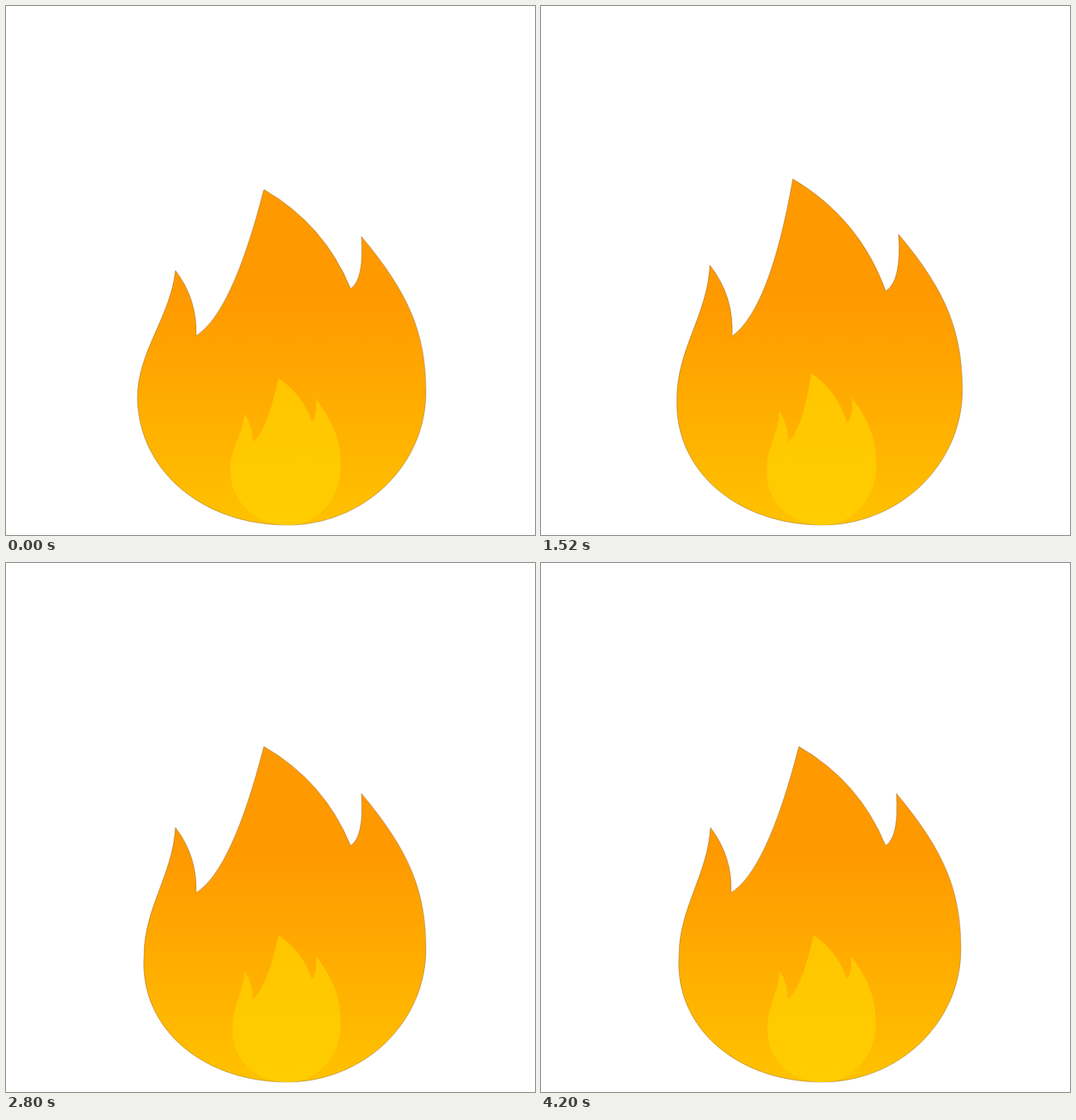
Recreate the animation shown at these times as an HTML page with a canvas. Size 640 by 640 pixels, loop 4.24 s.

```html
<!DOCTYPE html>
<html lang="en">
<head>
<meta charset="utf-8">
<title>Flame</title>
<style>
  html, body { margin: 0; width: 100%; height: 100%; overflow: hidden; background: #fff; }
  canvas { display: block; width: 100vmin; height: 100vmin; }
</style>
</head>
<body>
<canvas width="640" height="640"></canvas>
<script>
const ctx = document.querySelector('canvas').getContext('2d');
const LOOP = 4240, STEP = 40, CYCLE = 1400, BASE = 628;

// Each pose: how far the tongues bend, how much the bend sags into the notches,
// the widest x on both sides, and the tips and notches from left to right.
const low = { lean: 0.18, sag: 0.28, left: 159, right: 508,
  points: [[205, 320], [230, 399], [312, 222], [417, 342], [430, 279]] };
const leanLeft = { lean: 0.23, sag: 0.21, left: 153, right: 518,
  points: [[201, 285], [236, 402], [272, 152], [418, 359], [444, 264]] };
const upright = { lean: 0.02, sag: 0, left: 147, right: 511,
  points: [[210, 285], [240, 398], [328, 150], [418, 390], [444, 282]] };
const leanRight = { lean: -0.24, sag: 0.06, left: 144, right: 509,
  points: [[250, 244], [237, 374], [405, 143], [420, 397], [471, 292]] };

const lerp = (a, b, k) => a + (b - a) * k;
function mix(a, b, k) {
  const out = {};
  for (const key of ['lean', 'sag', 'left', 'right']) out[key] = lerp(a[key], b[key], k);
  out.points = a.points.map((p, i) => p.map((v, j) => lerp(v, b.points[i][j], k)));
  return out;
}
function grow(pose, k) {
  const points = pose.points.map(([x, y]) => [x, lerp(BASE, y, k)]);
  return { ...pose, left: lerp(pose.right, pose.left, k), points };
}

const easeIn = u => u * u, easeOut = u => u * (2 - u), easeBoth = u => u * u * (3 - 2 * u);
const narrow = { ...low, left: 167 };
const keys = [
  { at: 0, pose: narrow },
  { at: 440, pose: leanLeft, ease: easeBoth },
  { at: 600, pose: upright, ease: easeIn },
  { at: 820, pose: grow(mix(upright, leanRight, 0.75), 1.027), ease: easeOut },
  { at: 1080, pose: leanRight, ease: easeBoth },
  { at: CYCLE, pose: narrow, ease: easeBoth }
];

function poseAt(phase, first) {
  const n = keys.findIndex((key, i) => i > 0 && phase <= key.at);
  const from = keys[n - 1], to = keys[n];
  const start = first && n === 1 ? low : from.pose;
  return mix(start, to.pose, to.ease((phase - from.at) / (to.at - from.at)));
}

function flamePath({ lean, sag, left, right, points }) {
  const path = new Path2D();
  const leftY = 475, rightY = 467, reach = 0.37;

  // Handle at an outer tip: towards the side, turned by the lean, with a slight bulge.
  const tipHandle = ([x, y], sideX, sideY, side) => {
    const h = sideY - y, slope = (sideX - x) / h + side * 0.12 + 1.7 * lean;
    return [x + slope * h * reach, y + h * reach];
  };
  // Edge between a tip and a notch, bent sideways by the lean.
  const edge = ([x0, y0], [x1, y1], give) => {
    const dx = x1 - x0, dy = y1 - y0, sign = dy < 0 ? 1 : -1;
    const bend = sign * lean * give, slide = sign * lean > 0 ? -sign * sag : 0;
    path.quadraticCurveTo((x0 + x1) / 2 - bend * dy + slide * dx,
      (y0 + y1) / 2 + bend * dx + slide * dy, x1, y1);
  };

  const first = points[0], last = points[4];
  path.moveTo(left, leftY);
  path.bezierCurveTo(left, lerp(leftY, first[1], reach),
    ...tipHandle(first, left, leftY, -1), ...first);
  [1, 0.8, 0.95, 1.2].forEach((give, i) => edge(points[i], points[i + 1], give));
  path.bezierCurveTo(...tipHandle(last, right, rightY, 1),
    right, lerp(rightY, last[1], reach), right, rightY);
  path.bezierCurveTo(508, 556, 433, BASE, 340, BASE);
  path.bezierCurveTo(240, BASE, 161, 564, left, leftY);
  path.closePath();
  return path;
}

function gradient(top, from, to) {
  const g = ctx.createLinearGradient(0, top, 0, BASE);
  g.addColorStop(0, from);
  g.addColorStop(1, to);
  return g;
}
const outerFill = gradient(350, '#ff9900', '#ffc200');
const innerFill = gradient(408, '#ffc400', '#ffcd00');

// Sparks fly to one side (-1 or 1) or straight up (0), shrinking and darkening.
const sparks = [
  { start: 0, x: 211, side: -1 },
  { start: 720, x: 462, side: 1 },
  { start: 1560, x: 209, side: -1 },
  { start: 1860, x: 327, side: 0 },
  { start: 2280, x: 437, side: 1 }
];

function drawSpark(t, { start, x, side }) {
  const age = t - start;
  if (age < 0 || age > 400) return;
  const life = 1 - age / 800;
  const y = side ? 427 - 0.03 * age : 215 - 0.31 * age;
  ctx.fillStyle = `rgb(${255 * life}, ${153 * life}, 0)`;
  ctx.beginPath();
  ctx.arc(x + side * 0.26 * age, y, 17 * life, 0, 2 * Math.PI);
  ctx.fill();
}

function draw(now) {
  const t = Math.floor(now % LOOP / STEP) * STEP;
  const cycle = Math.min(2, Math.floor(t / CYCLE)), phase = t - cycle * CYCLE;
  ctx.clearRect(0, 0, 640, 640);
  sparks.forEach(spark => drawSpark(t, spark));

  const outer = flamePath(poseAt(phase, cycle === 0));
  ctx.fillStyle = outerFill;
  ctx.fill(outer);
  ctx.strokeStyle = 'rgba(80, 45, 0, 0.5)';
  ctx.lineWidth = 0.6;
  ctx.stroke(outer);

  // The inner flame copies the outer one; its height breathes less each cycle.
  const height = 0.437 + (0.031 - 0.025 * cycle) * Math.sin(Math.PI * phase / CYCLE);
  const inner = new Path2D();
  inner.addPath(outer, new DOMMatrix([0.384, 0, 0, height, 210, BASE * (1 - height)]));
  ctx.fillStyle = innerFill;
  ctx.fill(inner);
  requestAnimationFrame(draw);
}

draw(0);
</script>
</body>
</html>
```
